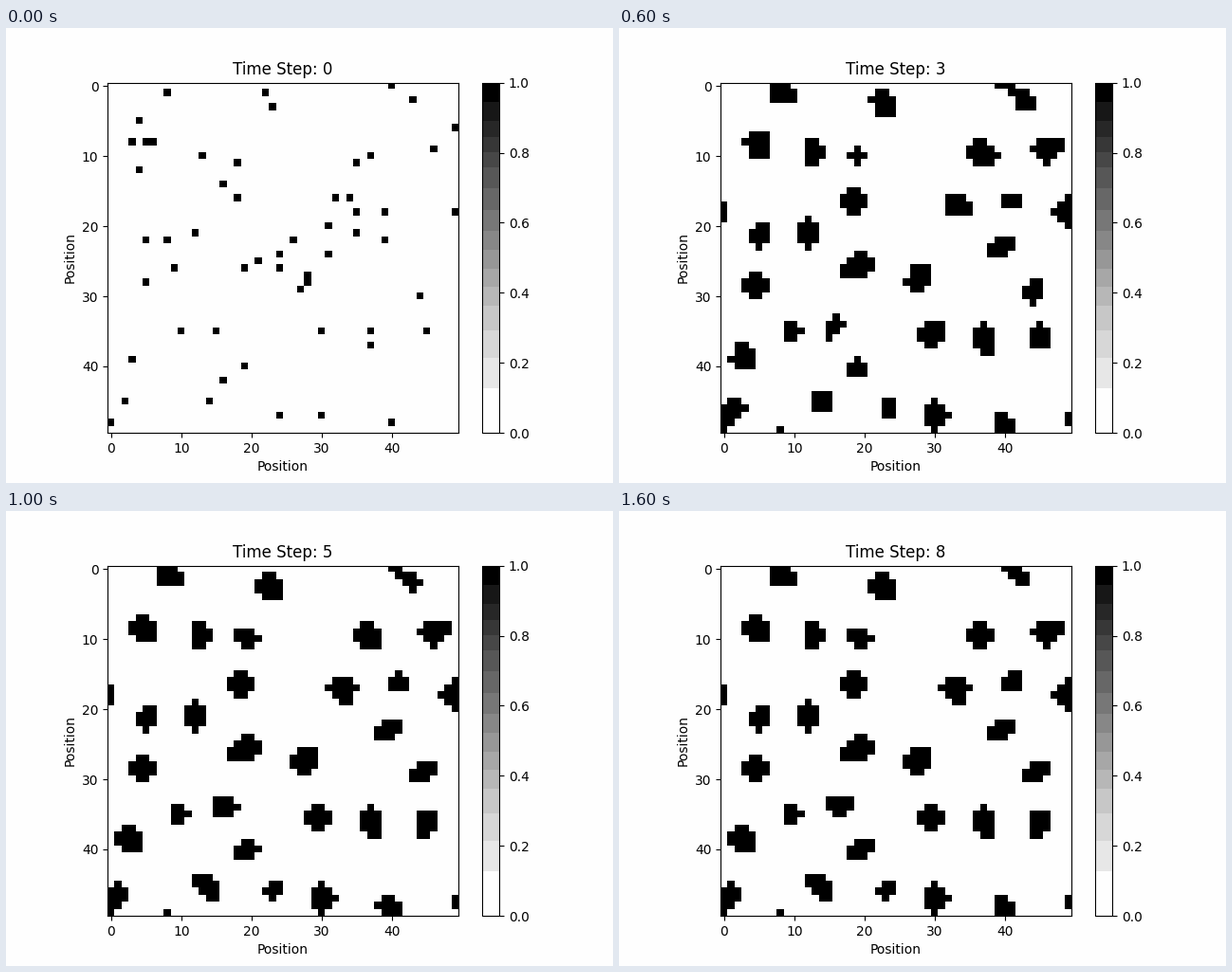
Recreate the animation shown at these times as a matplotlib script. Size 640 px wide and 480 px high, loop 1800 ms.

```python
import numpy as np
import matplotlib.pyplot as plt
from matplotlib.animation import FuncAnimation
from matplotlib.colors import ListedColormap

SIZE = 50
STEPS = 9
R_NEAR, R_FAR = 2, 6      # activation and inhibition radii (exclusive)
W_NEAR, W_FAR = 3, -1
PAPER = 254 / 255

# cells alive at the start, counted in reading order
SEEDS = [
    40, 58, 72, 143, 173, 254, 349, 403, 405, 406, 496, 513, 537, 568,
    585, 604, 716, 818, 832, 834, 935, 939, 949, 1031, 1062, 1085, 1105,
    1108, 1126, 1139, 1224, 1231, 1271, 1309, 1319, 1324, 1378, 1405, 1428,
    1477, 1544, 1760, 1765, 1780, 1787, 1795, 1887, 1953, 2019, 2116,
    2252, 2264, 2374, 2380, 2400, 2440,
]


def step(grid):
    """Nearby cells activate, cells in the outer ring inhibit; edges wrap."""
    field = np.zeros_like(grid)
    for dy in range(-R_FAR, R_FAR + 1):
        for dx in range(-R_FAR, R_FAR + 1):
            d2 = dx * dx + dy * dy
            if d2 < R_FAR ** 2:
                weight = W_NEAR if d2 < R_NEAR ** 2 else W_FAR
                field += weight * np.roll(grid, (dy, dx), axis=(0, 1))
    return (field > 0).astype(int)


def banded_greys():
    """The Greys map reduced to 16 flat levels."""
    grey = np.round(plt.get_cmap("Greys")(np.arange(256))[:, 0] * 255)
    band = grey // 16
    level = np.select([band == 0, band == 15], [0, PAPER],
                      (band * 16 + 7) / 255)
    return ListedColormap(np.column_stack([level] * 3))


start = np.zeros((SIZE, SIZE), dtype=int)
start.flat[SEEDS] = 1
states = [start]
while len(states) < STEPS:
    states.append(step(states[-1]))

fig, ax = plt.subplots(figsize=(6.4, 4.8), dpi=100, facecolor=(PAPER,) * 3)
image = ax.imshow(start, cmap=banded_greys(), vmin=0, vmax=1,
                  interpolation="nearest")
fig.colorbar(image, ax=ax)
ax.set_xlabel("Position")
ax.set_ylabel("Position")
title = ax.set_title("Time Step: 0")


def update(i):
    image.set_data(states[i])
    title.set_text(f"Time Step: {i}")
    return image, title


anim = FuncAnimation(fig, update, frames=STEPS, interval=200,
                     repeat=True, repeat_delay=0)
plt.show()
```
